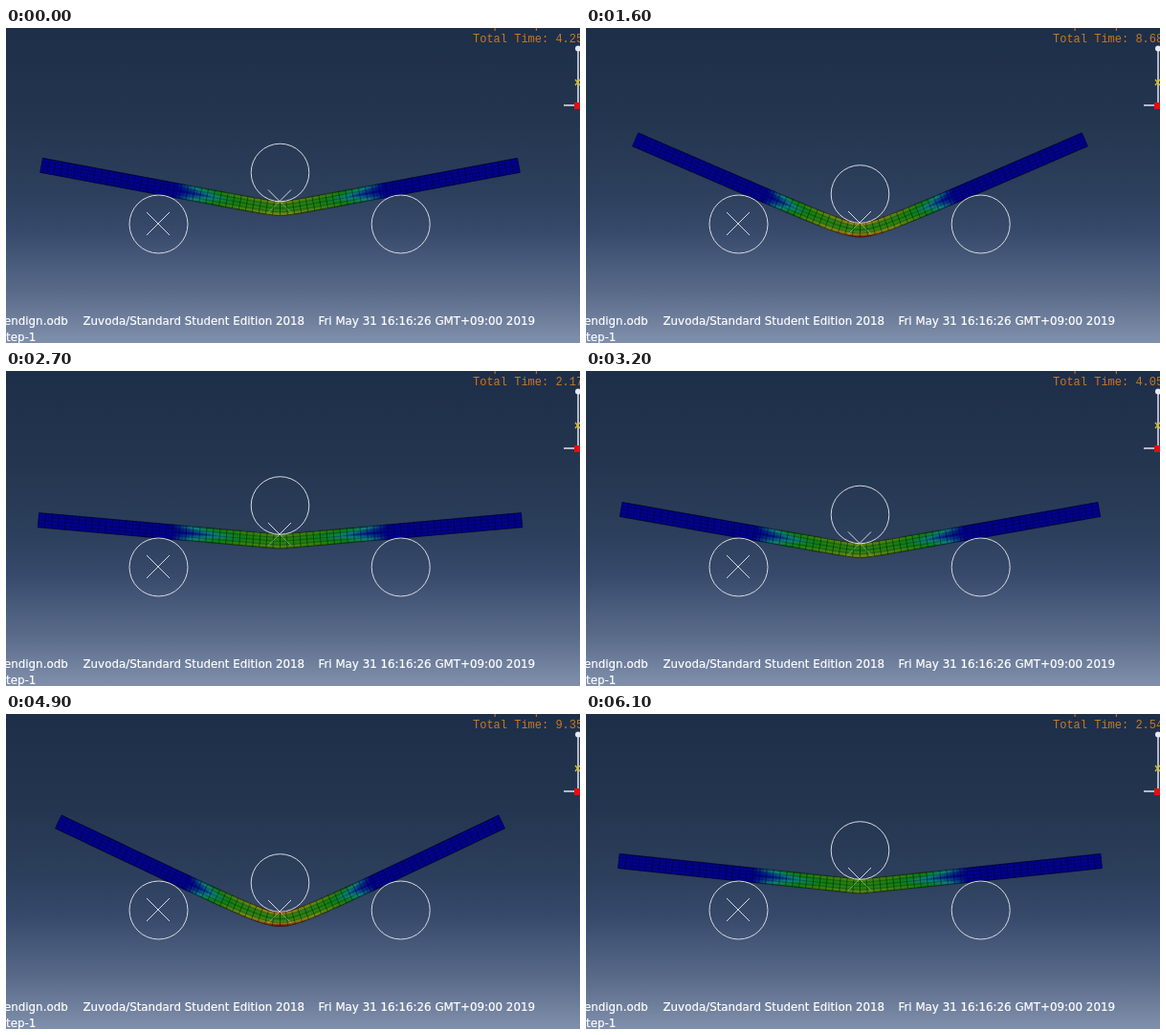
An HTML page with a canvas that plays this animation: 600x330 px, repeating every 6.2 s.

```html
<!DOCTYPE html>
<html lang="en">
<head>
<meta charset="utf-8">
<title>Three-point bending</title>
<style>
  html, body { margin: 0; width: 100%; height: 100%; overflow: hidden; }
  body {
    position: relative;
    background: linear-gradient(#1d2e49 0, #24364f 30%, #2c3f5c 52%, #36496a 64%, #5a6b8a 84%, #8090ac 100%);
  }
  canvas, svg { position: absolute; left: 0; top: 0; width: 600px; height: 330px; }
  .line { fill: none; stroke: #d6dae2; stroke-width: 1; }
  .label { font: 11.85px "DejaVu Sans", sans-serif; fill: #fff; stroke: #fff; stroke-width: .2; }
  .time { font: 12px "Liberation Mono", monospace; fill: #c87820; white-space: pre; }
</style>
</head>
<body>
<canvas id="beam" width="600" height="330"></canvas>
<svg viewBox="0 0 600 330">
  <g class="line">
    <circle cx="159.5" cy="205.5" r="30.5"/>
    <circle cx="412.7" cy="205.5" r="30.5"/>
    <path d="M147 193l24 24m0-24l-24 24"/>
    <g id="punch">
      <circle cx="286.5" cy="0" r="30.3"/>
      <path d="M274 18l12 12l12-12"/>
      <path d="M274 42l12-12l12 12" opacity=".4"/>
    </g>
  </g>
  <g class="time">
    <text x="488" y="0">Step: Step-1</text>
    <text id="clock" x="488" y="15"></text>
  </g>
  <path d="M598 21V81M583 81H598" fill="none" stroke="#e4e4f4" stroke-width="1.5"/>
  <circle cx="598" cy="21.500" r="3" fill="#e8e8f4"/>
  <path d="M595 54l5 6M600 54l-5 6" fill="none" stroke="#d8c020" stroke-width="1.3"/>
  <rect x="594" y="78" width="6" height="7" fill="#e01010"/>
  <g class="label">
    <text x="-2" y="311">endign.odb</text>
    <text x="80.500" y="311">Zuvoda/Standard Student Edition 2018</text>
    <text x="326.500" y="311">Fri May 31 16:16:26 GMT+09:00 2019</text>
    <text x="0" y="328">tep-1</text>
  </g>
</svg>
<script>
const ctx = document.getElementById('beam').getContext('2d');
const punch = document.getElementById('punch');
const clock = document.getElementById('clock');

const LOOP = 6200, STEP = 100;
const MID = 286.5, HALF = 253.5, THICK = 15;
const COLS = 72, ROWS = 10;   // columns per half, layers through the depth

// [ms, solver time]
const KEYS = [
  [0, 4.25], [200, 4.95], [600, 5.4], [700, 5.65], [1000, 6.55], [1400, 8.02],
  [2000, 10], [2100, 0], [2200, 0.35], [2800, 2.54], [3200, 4.05], [3400, 4.9],
  [3500, 5.17], [3900, 5.75], [4200, 6.75], [4900, 9.35], [5300, 10],
  [5400, 0], [6100, 2.54], [6200, 2.9]
];

function solverTime(ms) {
  const i = KEYS.findIndex(k => k[0] > ms);
  const [t0, a] = KEYS[i - 1], [t1, b] = KEYS[i];
  return a + (b - a) * (ms - t0) / (t1 - t0);
}

// Nodes of one half, from mid-span outwards: offset, height, unit normal
function halfBeam(T, punchY) {
  const angle = Math.max(0, 2.45 * T + 0.035 * T * T - 0.4) * Math.PI / 180;
  const m = Math.tan(angle), reach = 30.5 + THICK / 2;
  const cx = 159.5 + reach * Math.sin(angle);
  const cy = 205.5 - reach * Math.cos(angle);
  const apex = cy + (MID - cx) * m;
  const drop = Math.max(0.3, apex - (punchY + 30 + THICK / 2));
  const ds = HALF / COLS, nodes = [];
  let x = 0;
  for (let i = 0; i <= COLS; i++) {
    const h = Math.hypot(m * x, drop);
    const slope = m * m * x / h, len = Math.hypot(1, slope);
    nodes.push({ x, y: apex - h, nx: slope / len, ny: 1 / len });
    x += ds / len;
  }
  return nodes;
}

// Elastic core fades out with the moment; yielding adds to the outer fibres
function stress(s, eta, T) {
  const m = Math.max(0, 1 - s / (116 - 1.2 * T)), e = Math.abs(eta);
  const core = (1.5 + 0.8 * T) * m ** 2.5;
  return 0.54 * Math.tanh(core + 3 * m * e) + 0.06 * T * (m * e) ** 2;
}

function colour(v) {
  const light = 28 + 12 * Math.max(0, Math.min(1, v) - 0.5);
  return `hsl(${240 - 240 * Math.min(1, v)} ${100 - 20 * Math.min(1, v * 4)}% ${light}%)`;
}

function drawBeam(T, punchY) {
  const nodes = halfBeam(T, punchY);
  ctx.clearRect(0, 0, 600, 330);
  for (const side of [-1, 1]) {
    const at = (i, eta) => {
      const n = nodes[i], d = eta * THICK / 2;
      return [MID + side * (n.x + n.nx * d), n.y + n.ny * d];
    };
    const trace = points => {
      ctx.beginPath();
      points.forEach(p => ctx.lineTo(...p));
    };

    ctx.lineWidth = 0.6;
    for (let i = 0; i < COLS; i++) {
      for (let j = 0; j < ROWS; j++) {
        const a = 2 * j / ROWS - 1, b = a + 2 / ROWS;
        trace([at(i, a), at(i + 1, a), at(i + 1, b), at(i, b)]);
        ctx.closePath();
        ctx.fillStyle = ctx.strokeStyle =
          colour(stress((i + 0.5) * HALF / COLS, (a + b) / 2, T));
        ctx.fill();
        ctx.stroke();
      }
    }

    ctx.strokeStyle = 'rgba(0, 0, 16, .55)';
    ctx.lineWidth = 0.8;
    for (let i = 0; i <= COLS; i += 2) {
      trace([at(i, -1), at(i, 1)]);
      ctx.stroke();
    }
    for (let eta = -1; eta <= 1; eta += 0.5) {
      ctx.lineWidth = Math.abs(eta) === 1 ? 1.2 : 0.5;
      trace(nodes.map((n, i) => at(i, eta)));
      ctx.stroke();
    }
  }
}

let shown = -1;
function tick(now) {
  const ms = Math.floor(now % LOOP / STEP) * STEP;
  if (ms !== shown) {
    shown = ms;
    const T = solverTime(ms), y = 130 + 5.05 * T;
    drawBeam(T, y);
    punch.setAttribute('transform', `translate(0 ${Math.round(y * 2) / 2})`);
    clock.textContent = 'Total Time: ' + T.toFixed(3);
  }
  requestAnimationFrame(tick);
}
tick(performance.now());
</script>
</body>
</html>
```
